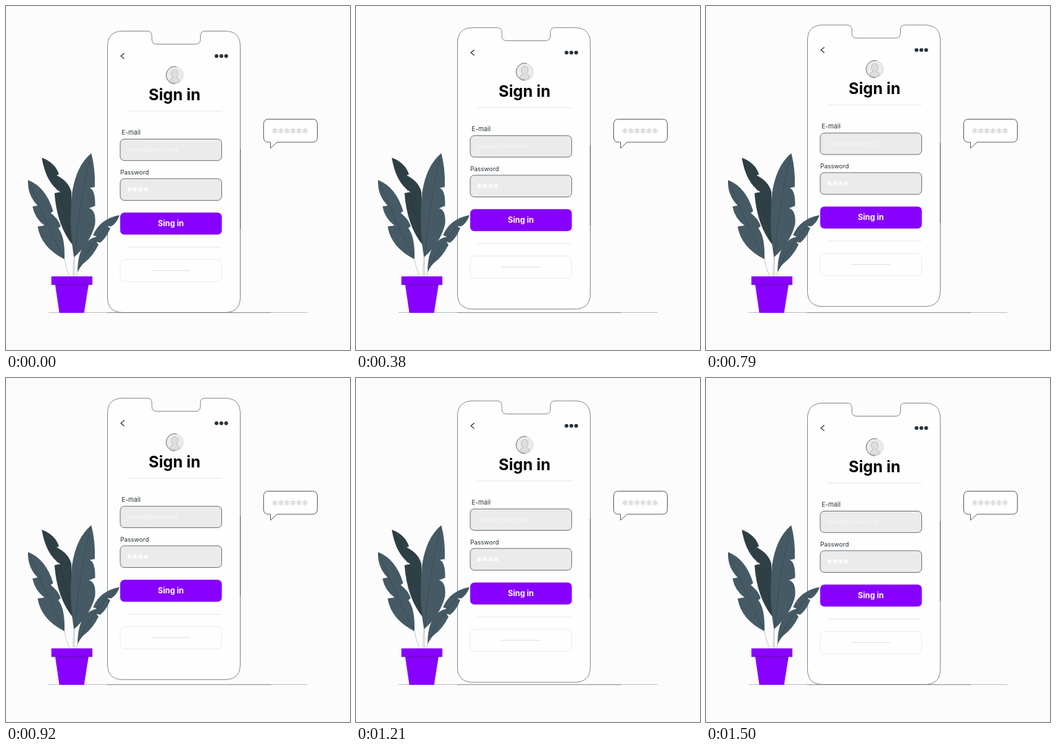
An HTML page with a canvas that plays this animation: 500x500 px, repeating every 1.54 s.

```html
<!DOCTYPE html>
<html lang="en">
<head>
<meta charset="utf-8">
<title>Sign in</title>
<style>
  html, body { margin: 0; width: 100%; height: 100%; overflow: hidden; background: #fcfcfc; }
  canvas { display: block; width: 500px; height: 500px; }
</style>
</head>
<body>
<canvas id="stage" width="500" height="500"></canvas>
<script>
const ctx = document.getElementById('stage').getContext('2d');
const LOOP = 1540, FLOAT_PERIOD = 1500, FLOAT_HEIGHT = 10, FPS = 24;
const INK = '#263238', SLATE = '#455a64', DARK_LEAF = '#2f3f46';
const PURPLE = '#8800ff', GREY = '#ebebeb', WHITE = '#fff';

function paint(path, fill, stroke, width = 0.7) {
  if (fill) { ctx.fillStyle = fill; ctx.fill(path); }
  if (stroke) { ctx.strokeStyle = stroke; ctx.lineWidth = width; ctx.stroke(path); }
}

function shape(d, fill, stroke, width) {
  paint(new Path2D(d), fill, stroke, width);
}

function box(x, y, w, h, r, fill, stroke, width) {
  const path = new Path2D();
  path.roundRect(x, y, w, h, r);
  paint(path, fill, stroke, width);
}

function disc(x, y, r, fill, stroke, width) {
  const path = new Path2D();
  path.arc(x, y, r, 0, Math.PI * 2);
  paint(path, fill, stroke, width);
}

function label(text, x, y, font, color, align = 'left') {
  ctx.font = font + ' Inter, sans-serif';
  ctx.fillStyle = color;
  ctx.textAlign = align;
  ctx.fillText(text, x, y);
}

function stars(count, x, y, step, r, color, width) {
  ctx.strokeStyle = color;
  ctx.lineWidth = width;
  ctx.beginPath();
  for (let i = 0; i < count; i++) {
    for (let arm = 0; arm < 3; arm++) {
      const angle = Math.PI / 2 + arm * Math.PI / 3;
      const dx = r * Math.cos(angle), dy = r * Math.sin(angle);
      ctx.moveTo(x + i * step - dx, y - dy);
      ctx.lineTo(x + i * step + dx, y + dy);
    }
  }
  ctx.stroke();
}

function drawAvatar() {
  disc(245.2, 100.6, 12.5, GREY);
  shape('M238 109.5Q238.5 105 243 104Q239.800 101 240.3 97Q241 92.700 245.2 92.700Q249.500 92.700 250 97Q250.500 101 247.500 104Q252 105 252.500 109.500Q245 114 238 109.500Z',
    '#dedede', '#a8a8a8', 0.6);
  disc(245.2, 100.6, 12.5, null, '#c4c4c4', 0.5);
  shape('M248 88.400A12.5 12.5 0 1 0 246 113.100', null, INK, 0.6);
}

function drawPhone() {
  shape('M170 36.500H205Q212 36.500 212 43.500V48.500Q212 55.500 219 55.500H275.500Q282.500 55.500 282.500 48.500V43.500Q282.500 36.500 289.500 36.500H318Q340.500 36.500 340.500 59V423Q340.500 445.500 318 445.500H170Q147.500 445.500 147.500 423V59Q147.500 36.500 170 36.500Z',
    '#fefefe', INK, 0.55);
  shape('M340.500 208V324', null, INK, 0.6);

  shape('M172 68.700L167 72.800L172 76.900', null, INK, 1.2);
  for (const x of [306, 313, 320]) disc(x, 72.8, 2.75, INK);
  drawAvatar();
  label('Sign in', 245, 137.2, '700 22.8px', '#000', 'center');
  shape('M176 152.700H314', null, '#e0e0e0', 0.7);

  label('E-mail', 168, 187.2, '400 9.2px', INK);
  box(166, 193.5, 147.5, 31.2, 6, GREY, INK, 0.65);
  label('name@home.test', 176.3, 211.8, '300 9px', '#fafafa');

  label('Password', 166, 245.2, '400 9px', INK);
  box(166, 251, 147.5, 31.6, 6, GREY, INK, 0.65);
  stars(4, 179.5, 266.7, 8, 3.6, WHITE, 1.3);

  box(166, 300.4, 147.7, 32, 6, PURPLE);
  label('Sing in', 239.6, 319.9, '700 11.4px', WHITE, 'center');

  shape('M177 350.500H313', null, '#dedede', 0.7);
  box(166, 368.400, 147.5, 32.4, 6, null, '#e8e8e8', 0.8);
  shape('M211 384.500H268', null, '#d8d8d8', 0.8);
}

function drawBubble() {
  shape('M381.500 164.500H445.500Q452.500 164.500 452.500 171.500V191Q452.500 198 445.500 198H394L384.500 206.700V198H381.500Q374.500 198 374.500 191V171.500Q374.500 164.500 381.500 164.500Z',
    WHITE, INK, 0.75);
  stars(6, 390.7, 181.3, 8.8, 4.2, '#dadada', 1.9);
}

function drawPlant() {
  // stems
  shape('M84 364Q87 380 92 393M97 345Q100 370 99.500 393M100 362Q97 378 97.500 393M105 384L102.500 393', null, '#a4adb1', 0.6);

  shape('M52 220.500Q72 228 77 245L73.500 246Q91 255 95 270L98 349Q74 320 70.500 272L79 270.500Q58 257 52 220.500Z', DARK_LEAF);
  shape('M32 253Q58 263 68.500 298L65 301Q76 309 79.500 320L76 323Q86 335 85 368Q51 351 46 320.500L56 319Q42 309 38.500 291.500L46 290Q31 275 32 253Z', SLATE);
  shape('M124 214Q130 237 129 263L121.500 264.500Q130 267 129.500 290.500L120.500 294Q131 296 129.500 317Q123 344 99 365Q91 325 96 272Q102 232 124 214Z', SLATE);
  shape('M165 304Q161 316 152.500 320.500L146.500 319.500L151.500 323Q146 337 137 344L131.500 343L134.500 347Q126 364 114 373Q108 378 104 387Q104 360 114 347Q123 336 132 335.500L126.500 333Q137 309 165 304Z', SLATE);

  // veins
  shape('M33 254Q60 320 84 366M53 222Q83 275 97 345M123 216Q106 287 100 362M163 305Q123 340 105 384', null, 'rgba(38,50,56,.55)', 0.6);

  shape('M71.500 405H120L113.500 446H77.500Z', PURPLE);
  box(66, 393, 59.5, 12.2, 0, PURPLE);
  shape('M66 405.200H125.500', null, 'rgba(38,50,56,.7)', 0.6);
}

function drawGround() {
  shape('M62 445.500H438', null, '#a3a9ac', 0.7);
  shape('M147 445.700H385', null, '#777f83', 0.7);
}

// Triangle-wave float, held on each 24 fps step.
function lift(time) {
  const tick = Math.floor((Math.floor(time / 10) * 10 + 4.9) * FPS / 1000);
  const phase = ((tick * 1000 / FPS + 25) % FLOAT_PERIOD) / FLOAT_PERIOD;
  return 0.3 - FLOAT_HEIGHT * (1 - Math.abs(1 - 2 * phase));
}

function draw(now) {
  ctx.fillStyle = '#fcfcfc';
  ctx.fillRect(0, 0, 500, 500);
  drawGround();
  ctx.save();
  ctx.translate(0, lift(now % LOOP));
  drawPhone();
  ctx.restore();
  drawBubble();
  drawPlant();
  requestAnimationFrame(draw);
}
requestAnimationFrame(draw);
</script>
</body>
</html>
```
